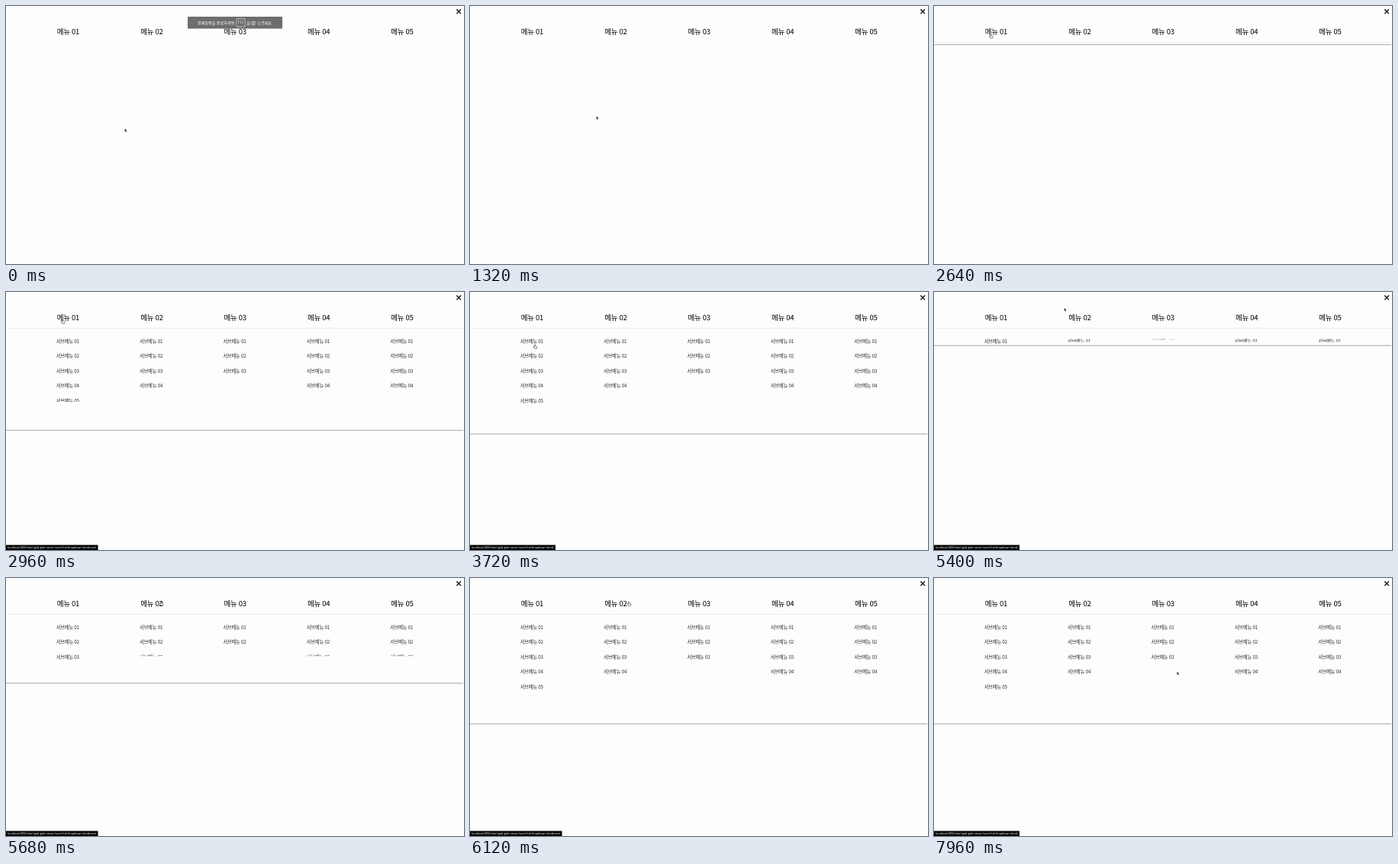
An HTML page that plays this animation: 600x338 px, repeating every 8 s.

```html
<!DOCTYPE html>
<html lang="ko">
<head>
<meta charset="utf-8">
<style>
html, body { margin: 0; width: 100%; height: 100%; overflow: hidden; background: #fdfdfe; }
svg { display: block; width: 600px; height: 338px; font-family: "Noto Sans CJK KR", "Noto Sans CJK", "Noto Sans", sans-serif; }
.menu, .sub { text-anchor: middle; letter-spacing: -.035em; }
.menu { font-size: 9.55px; font-weight: 500; fill: #000; }
.sub { font-size: 6.25px; fill: #2c2c2c; }
</style>
</head>
<body>
<svg viewBox="0 0 600 338">
  <path d="M590.3 4.5l5.6 5.6m0-5.6l-5.6 5.6" stroke="#000" stroke-width="1.3"/>
  <g id="panel">
    <rect y="46.8" width="600" height="1" fill="#eeeef0"/>
    <rect id="edge" width="599" height="1.4" fill="#bebec0"/>
  </g>
  <g id="columns"></g>
  <g id="toast" fill="#fff" font-size="5.1">
    <rect x="238" y="14" width="124" height="15.6" fill="#6d6d70"/>
    <text x="251" y="23.7">전체화면을 종료하려면</text>
    <rect x="302" y="16.5" width="11" height="10.6" rx="1" fill="none" stroke="#ddd" stroke-width=".7"/>
    <text x="307.5" y="23.4" font-size="4.2" text-anchor="middle">F11</text>
    <text x="315" y="23.7">을(를) 누르세요.</text>
  </g>
  <g id="status">
    <rect id="statusBox" y="331.4" height="6.6" fill="#000"/>
    <text id="statusText" x="1.7" y="336.2" font-size="3.62" fill="#fff"></text>
  </g>
  <g id="cursor">
    <path id="arrow" d="M0 0v4.3l1-.9.7 1.6.8-.4-.7-1.5h1.3z" fill="#111" stroke="#fff" stroke-width=".3"/>
    <path id="hand" d="M-.6 .3q.6-.7 1.1 0v1.5l1.9.5q.5.2.4.8l-.4 1.9h-2.8l-1.5-2q.2-.7 1.3 0z" fill="#fff" stroke="#222" stroke-width=".55"/>
  </g>
</svg>
<script>
const LOOP = 8000, STEP = 10, PITCH = 19.53, SLIDE = 500;
const URL_TEXT = "localhost:3000/html/gnb/gnb-menu-hover-full-dropdown.html";
const $ = id => document.getElementById(id);

const counts = [5, 4, 3, 4, 4];
const columnX = i => 300.2 + 109.375 * (i - 2);

$("columns").innerHTML = counts.map((n, i) => {
  const x = columnX(i);
  const items = Array.from({ length: n }, (_, k) =>
    `<text class="sub" x="${x - .7}" y="${66.8 + k * PITCH}">서브메뉴 0${k + 1}</text>`).join("");
  return `<clipPath id="clip${i}"><rect id="mask${i}" x="${x - 50}" y="53" width="100"/></clipPath>
    <text class="menu" x="${x}" y="36.9">메뉴 0${i + 1}</text><g clip-path="url(#clip${i})">${items}</g>`;
}).join("");

// Pointer moves: start time, end time, x, y
const moves = [
  [0, 1, 155.6, 160.5],
  [880, 1120, 167, 145.3],
  [1280, 1760, 97, 93.5],
  [1880, 2700, 74, 36.3],
  [3300, 3690, 85, 69],
  [4120, 4520, 86, 107.5],
  [4520, 4880, 87, 141.5],
  [5000, 5170, 130, 8],
  [5170, 5600, 203, 31],
  [6080, 6400, 315, 35.5],
  [6600, 6720, 310, 36.5],
  [6840, 7680, 305, 98.5],
  [7840, 7960, 318.3, 122.6]
];

function pointer(t) {
  let [, , x, y] = moves[0];
  for (const [start, end, toX, toY] of moves) {
    if (t <= start) break;
    const u = Math.min(1, (t - start) / (end - start)), k = u * u * (3 - 2 * u);
    x += (toX - x) * k;
    y += (toY - y) * k;
  }
  return [x, y];
}

// CSS "ease" curve, solved by bisection
function ease(x) {
  if (x >= 1) return 1;
  let lo = 0, hi = 1, s;
  for (let i = 0; i < 24; i++) {
    s = (lo + hi) / 2;
    if (.75 * s * (1 - s) + s ** 3 < x) lo = s; else hi = s;
  }
  return .3 * s * (1 - s) ** 2 + 3 * s * s * (1 - s) + s ** 3;
}

// Link fragment under the pointer; submenus react only while the panel shows
function linkAt(y, open) {
  if (y > 28 && y < 38) return "#none";
  return open > 0 && y > 56 && y < 150 ? "#" : "";
}

// Run the hover logic once over the loop: the panel opens and closes with the link
const states = [];
let open = 0, from = 0, target = 0, since = 0, duration = 1;
for (let t = 0; t < LOOP; t += STEP) {
  const link = linkAt(pointer(t)[1], open), want = link ? 1 : 0;
  if (want !== target) {
    from = open;
    target = want;
    since = t;
    duration = Math.max(1, SLIDE * Math.abs(target - from));
  }
  open = from + (target - from) * ease((t - since) / duration);
  states.push({ open, link });
}

const stateAt = t => states[Math.max(0, Math.floor(t / STEP))];
const show = (id, on) => $(id).style.display = on ? "" : "none";

function draw(t) {
  const { open, link } = stateAt(t), [x, y] = pointer(t);
  show("panel", open > 0);
  $("edge").setAttribute("y", 46.4 + 144 * open);
  counts.forEach((n, i) => $("mask" + i).setAttribute("height", n * PITCH * open));

  $("toast").style.opacity = Math.max(0, 1 - t / 480);

  // The address bar appears late and lingers
  const fragment = stateAt(t - 150).link || stateAt(t - 400).link;
  show("status", fragment);
  $("statusText").textContent = URL_TEXT + fragment;
  $("statusBox").setAttribute("width", fragment === "#" ? 112 : 120.5);

  const column = counts.findIndex((_, i) => Math.abs(x - columnX(i)) < 55);
  const isHand = link && y < 58.5 + PITCH * counts[column];
  show("hand", isHand);
  show("arrow", !isHand);
  $("cursor").setAttribute("transform", `translate(${x} ${y})`);
}

const begin = performance.now();
function tick() {
  draw((performance.now() - begin) % LOOP);
  requestAnimationFrame(tick);
}
tick();
</script>
</body>
</html>
```
